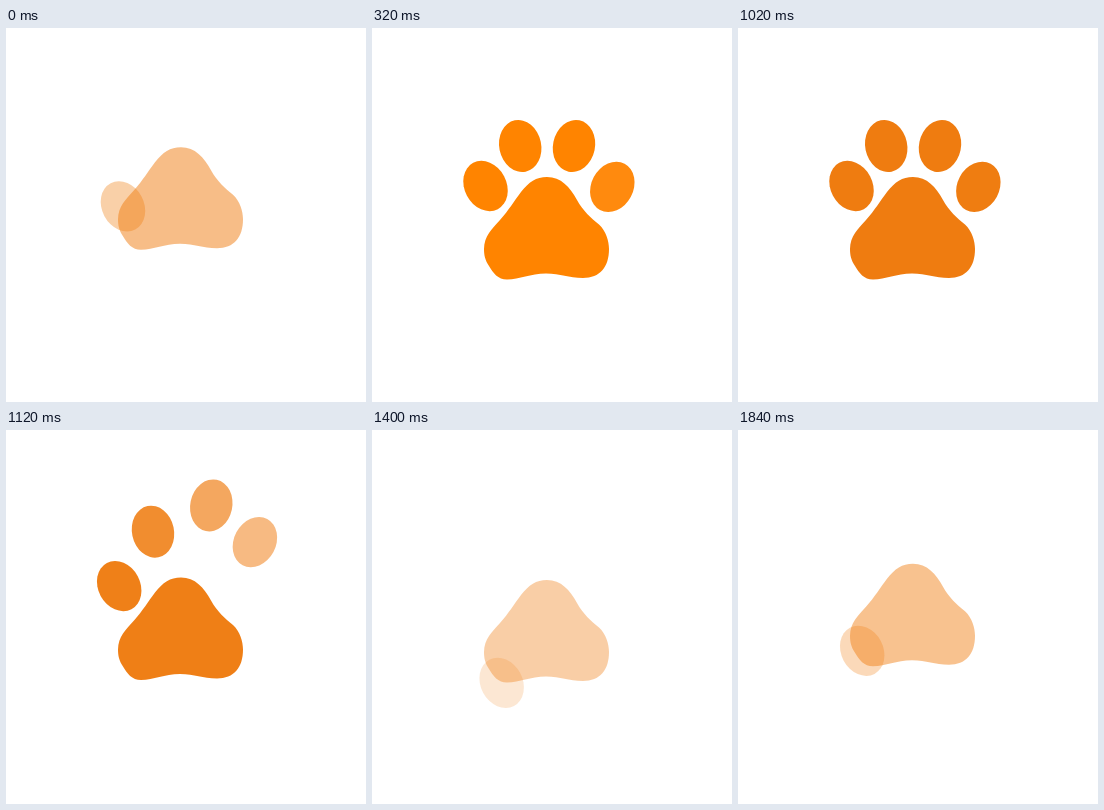
Animation, 360 px wide and 374 px high, one loop 1.86 s. Source, as an HTML page with a canvas:

```html
<!DOCTYPE html>
<html lang="en">
<head>
<meta charset="utf-8">
<title>Paw</title>
<style>
  html, body { margin: 0; width: 100%; height: 100%; overflow: hidden; background: #fff; }
  canvas { display: block; }
</style>
</head>
<body>
<canvas id="stage" width="360" height="374"></canvas>
<script>
const ctx = document.getElementById('stage').getContext('2d');
const LOOP = 1860, FLOOR = 327, AXIS = 174.5, REACH = 358, START = 140;

const padPath = new Path2D(
  'M175 149C189 149 198 159 205 172C211 183 219 190 227 196.5' +
  'C234 203 237 213 237 221C237 239 228 250 211 250' +
  'C196 250 189 245.5 174 245.5C158 245.5 148 251.5 135 251.5' +
  'C126 251.5 121 245 117 238C113 232 112 227 112 221' +
  'C112 208 120 201 128 192C137 182 142 173 149 164' +
  'C157 154 164 149 175 149Z');

function toePath(x, y, tilt) {
  const p = new Path2D();
  p.ellipse(x, y, 21, 26.2, tilt * Math.PI / 180, 0, Math.PI * 2);
  return p;
}

// enter: start, rise, settle and fade times, overshoot; leave: start, length, drop
const pad = { path: padPath, x: AXIS, at: 1640, rise: 277, settle: 175, fade: 480, over: 48,
              out: 1100, len: 443, drop: 340 };
const toe = (x, y, tilt, at, over, out, len, drop) => ({
  path: toePath(x, y, tilt), x, at, rise: 128, settle: 120, fade: 260, over, out, len, drop });

const parts = [
  pad,
  toe(113.5, 158, -28, 1782, 36, 1098, 357, 248),
  toe(148.2, 118, -12, 10, 43, 1070, 274, 310),
  toe(202, 118, 12, 42, 43, 1042, 198, 310),
  toe(240.3, 159, 28, 76, 40, 1018, 190, 380)
];

const clamp = v => Math.max(0, Math.min(1, v));
const wave = p => (1 - Math.cos(Math.PI * clamp(p))) / 2;
const backIn = p => p * p * (3.1 * p - 2.1);
const since = (t, from) => (t - from + LOOP) % LOOP;

function pose(part, t) {
  const age = since(t, part.at);
  const leave = age - since(part.out, part.at);
  if (leave >= 0) {
    const p = clamp(leave / part.len);
    return { dy: part.drop * backIn(p), alpha: 1 - Math.pow(p, 1.2) };
  }
  const dy = age < part.rise
    ? START - (START + part.over) * wave(age / part.rise)
    : -part.over * (1 - wave((age - part.rise) / part.settle));
  return { dy, alpha: 0.08 + 0.92 * clamp(age / part.fade) };
}

// the orange brightens while the paw gathers, then dims again
function tint(t) {
  const k = t < 320 ? 1 - t / 320 : clamp((t - 320) / 700);
  const mix = (a, b) => Math.round(a + (b - a) * k);
  return `rgb(${mix(255, 239)},${mix(132, 124)},${mix(0, 16)})`;
}

function draw(t) {
  ctx.fillStyle = '#fff';
  ctx.fillRect(0, 0, 360, 374);
  ctx.save();
  ctx.beginPath();
  ctx.rect(0, 0, 360, FLOOR);
  ctx.clip();
  ctx.fillStyle = tint(t);
  for (const part of parts) {
    const { dy, alpha } = pose(part, t);
    if (alpha <= 0) continue;
    ctx.save();
    ctx.globalAlpha = alpha;
    // toes slide along lines that meet below the pad
    ctx.translate(dy * (AXIS - part.x) / REACH, dy);
    ctx.fill(part.path);
    ctx.restore();
  }
  ctx.restore();
}

const begin = performance.now();
function tick() {
  draw((performance.now() - begin) % LOOP);
  requestAnimationFrame(tick);
}
tick();
</script>
</body>
</html>
```
